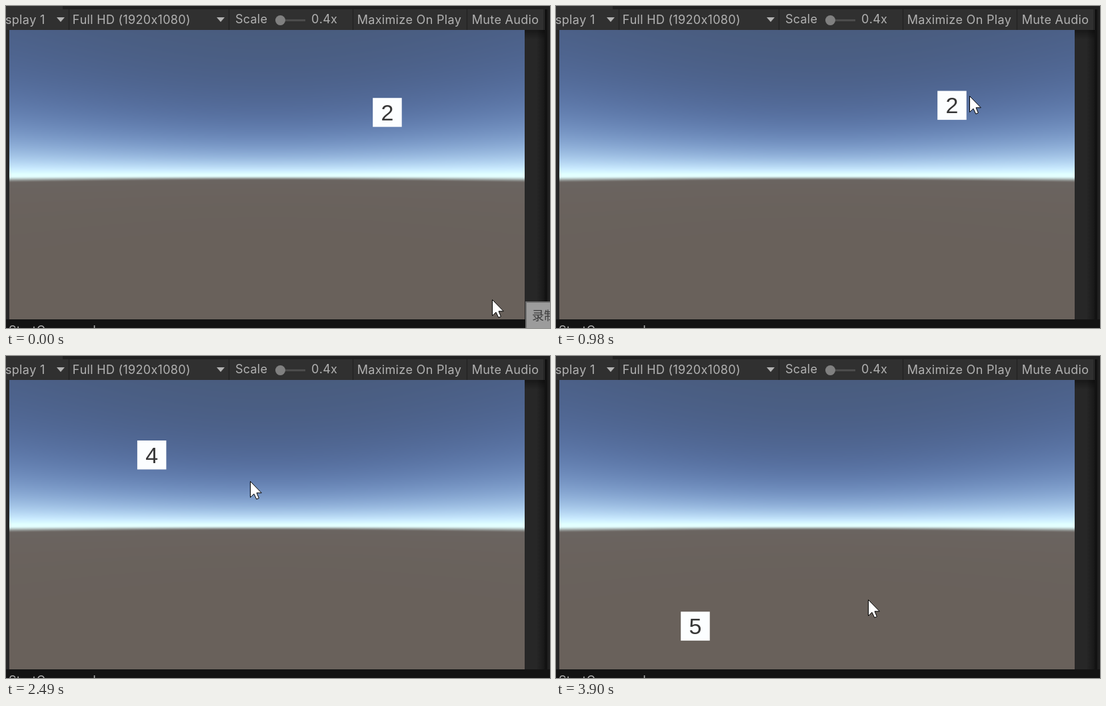
These frames come from a looping animation (816 px wide and 484 px high, 4030 ms). An HTML page with a canvas:

```html
<!DOCTYPE html>
<html lang="en">
<head>
<meta charset="utf-8">
<style>
  html, body { margin: 0; width: 100%; height: 100%; overflow: hidden; background: #262626; }
  canvas { display: block; }
</style>
</head>
<body>
<canvas id="stage" width="816" height="484"></canvas>
<script>
const LOOP = 4030, STEPS = 32;
const VIEW = { x: 5, y: 36, w: 773, h: 435 };
const TILE_SIZE = 43.5;

// Pointer path: step, x, y
const PATH = [
  [0, 729, 441], [2, 585, 261], [3, 559, 198], [5, 521, 174], [6, 542, 176],
  [8, 620, 135], [10, 586, 138], [13, 591, 183], [15, 458, 196], [18, 230, 142],
  [19, 216, 124], [20, 366, 188], [23, 461, 259], [24, 476, 387], [31, 468, 366]
];
// Tile jumps: step, x, y
const JUMPS = [
  [0, 550.2, 138.2], [5, 572.2, 127.6], [12, 196.9, 127],
  [22, 467.4, 351.4], [28, 187.2, 384.3]
];
// Steps at which the tile counts up
const CLICKS = [10, 20, 25];

const ctx = document.getElementById('stage').getContext('2d');
const pointer = new Path2D('M.5.5V24.5L6 19.3L9.8 27.3L13.4 25.7L10 17.8H17.3Z');

const lerp = (a, b, k) => a + (b - a) * k;
const clamp = k => Math.min(1, Math.max(0, k));

function rect(g, color, x, y, w, h) {
  g.fillStyle = color;
  g.fillRect(x, y, w, h);
}

function label(g, text, x, y) {
  g.font = '18px Inter, sans-serif';
  g.fontKerning = 'none';
  g.letterSpacing = '0.3px';
  g.fillStyle = '#b2b2b2';
  g.fillText(text, x, y);
}

// Haze thins out exponentially above the horizon, at a different rate per channel
function skyColor(elevation) {
  const up = Math.max(0, elevation);
  const haze = (base, gain, depth) => Math.min(255, base + gain * Math.exp(-up / depth));
  const sky = [haze(72, 155, 0.1), haze(90, 168, 0.115), haze(116, 152, 0.185)];
  const k = clamp((-0.004 - elevation) / 0.019);
  const mix = k * k * (3 - 2 * k);
  const glow = Math.exp(Math.min(0, elevation) / 0.08);
  return [105 + 2 * glow, 97 + 4 * glow, 91 + 7 * glow].map((c, i) => lerp(sky[i], c, mix));
}

function drawSky(g) {
  const image = g.createImageData(VIEW.w, VIEW.h);
  const scale = Math.tan(Math.PI / 6) / (VIEW.h / 2);
  for (let y = 0, p = 0; y < VIEW.h; y++) {
    const v = (VIEW.h / 2 - y - 0.5) * scale;
    for (let x = 0; x < VIEW.w; x++, p += 4) {
      const u = (x + 0.5 - VIEW.w / 2) * scale;
      image.data.set([...skyColor(v / Math.hypot(1, u, v)), 255], p);
    }
  }
  g.putImageData(image, VIEW.x, VIEW.y);
}

function drawArrow(g, x) {
  g.fillStyle = '#b2b2b2';
  g.fill(new Path2D(`M${x} 17h12l-6 7z`));
}

function shade(g, x0, y0, x1, y1, w, h) {
  const fade = g.createLinearGradient(x0, y0, x1, y1);
  fade.addColorStop(0, 'rgba(0,0,0,0)');
  fade.addColorStop(1, 'rgba(0,0,0,.4)');
  rect(g, fade, Math.min(x0, x1), Math.min(y0, y1), w, h);
}

function makeBackdrop() {
  const layer = document.createElement('canvas');
  layer.width = 816;
  layer.height = 484;
  const g = layer.getContext('2d');

  rect(g, '#272727', 0, 0, 816, 484);
  rect(g, '#202020', 85, 0, 731, 5);
  rect(g, '#303030', 0, 0, 85, 5);
  rect(g, '#303030', 0, 5, 808, 31);
  for (const x of [94, 334, 520, 691, 806]) rect(g, '#202020', x, 5, 1, 31);
  shade(g, 778, 50, 778, 36, 30, 14);
  shade(g, 796, 36, 808, 36, 12, 435);
  rect(g, '#121212', 808, 5, 4, 466);
  rect(g, '#202020', 812, 5, 4, 466);
  rect(g, '#131313', 0, 471, 816, 13);
  drawSky(g);

  label(g, 'splay 1', -1, 27);
  label(g, 'Full HD (1920x1080)', 99.7, 27);
  label(g, 'Scale', 344, 26);
  label(g, '0.4x', 458, 26);
  label(g, 'Maximize On Play', 526.7, 27);
  label(g, 'Mute Audio', 698.7, 27);
  label(g, 'StartCommand', 4, 494);
  drawArrow(g, 76);
  drawArrow(g, 316);

  rect(g, '#4c4c4c', 411, 20, 38, 3);
  g.fillStyle = '#808080';
  g.beginPath();
  g.arc(411.5, 21.5, 7.5, 0, 2 * Math.PI);
  g.fill();
  return layer;
}

function drawTile(step) {
  const [, x, y] = JUMPS.findLast(jump => jump[0] <= step);
  const digit = 2 + CLICKS.filter(click => click <= step).length;
  rect(ctx, '#fcfeff', x, y, TILE_SIZE, TILE_SIZE);
  ctx.font = '34px "Liberation Sans", Arial, sans-serif';
  ctx.textAlign = 'center';
  ctx.fillStyle = '#363636';
  ctx.fillText(digit, x + TILE_SIZE / 2, y + 33.5);
  ctx.textAlign = 'left';
}

function drawTooltip() {
  rect(ctx, '#6e6e6e', 779, 444, 37, 40);
  rect(ctx, '#9c9c9c', 781, 446, 35, 38);
  ctx.font = '18px "Noto Sans CJK SC", "Noto Sans CJK", sans-serif';
  ctx.fillStyle = '#3c3c3c';
  ctx.fillText('录制', 789, 472);
}

function drawCursor(step) {
  const next = Math.max(1, PATH.findIndex(key => key[0] >= step));
  const [s0, x0, y0] = PATH[next - 1];
  const [s1, x1, y1] = PATH[next];
  const k = (step - s0) / (s1 - s0);
  ctx.save();
  ctx.translate(Math.round(lerp(x0, x1, k)), Math.round(lerp(y0, y1, k)));
  ctx.fillStyle = '#fff';
  ctx.fill(pointer);
  ctx.strokeStyle = '#000';
  ctx.stroke(pointer);
  ctx.restore();
}

const backdrop = makeBackdrop();
const start = performance.now();

function frame() {
  const t = (performance.now() - start) % LOOP;
  const step = Math.min(STEPS - 1, Math.floor(t / LOOP * STEPS + 0.3));
  ctx.drawImage(backdrop, 0, 0);
  drawTile(step);
  if (step === 0) drawTooltip();
  drawCursor(step);
  requestAnimationFrame(frame);
}
frame();
</script>
</body>
</html>
```
